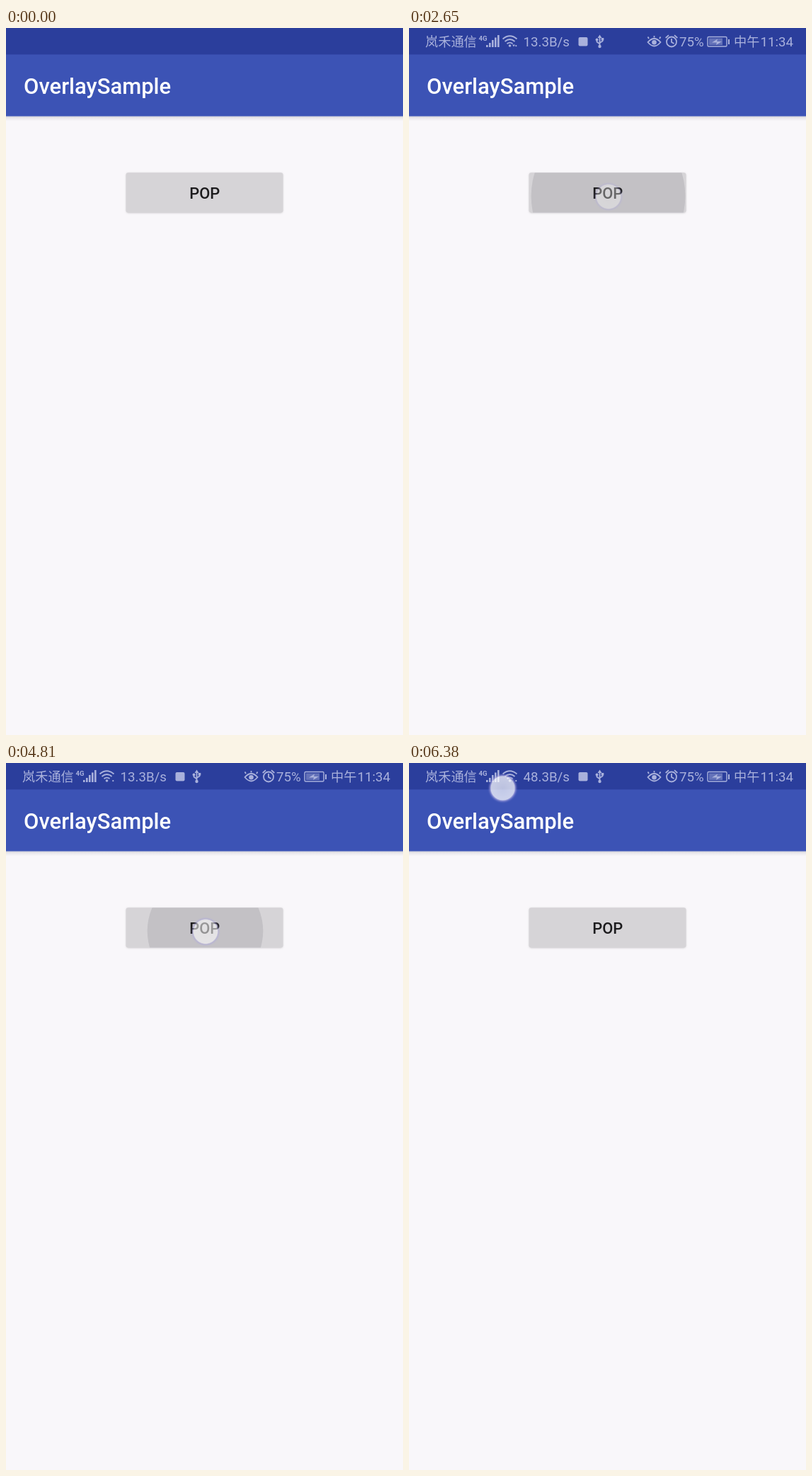
Recreate the animation shown at these times as an HTML page. Size 561 by 998 pixels, loop 6.6 s.

```html
<!DOCTYPE html>
<html lang="zh-CN">
<head>
<meta charset="utf-8">
<title>Popup demo</title>
<style>
html, body { margin: 0; width: 100%; height: 100%; overflow: hidden; background: #f9f7fa; }
svg { display: block; }
text { font-family: Roboto, "Noto Sans CJK SC", "Noto Sans CJK", sans-serif; }
.status { font-size: 18.7px; fill: #a9b1dc; }
.status .han { font-size: 18.2px; }
.status .network { font-size: 9.5px; font-weight: 700; }
.line { fill: none; stroke: #a9b1dc; stroke-width: 1.8; }
.menu { font-size: 21.6px; font-weight: 300; fill: #69686c; text-anchor: middle; }
</style>
</head>
<body>
<svg width="561" height="998" viewBox="0 0 561 998">
  <defs>
    <linearGradient id="barShadow" x2="0" y2="1">
      <stop stop-color="#888794" stop-opacity=".34"/>
      <stop offset=".4" stop-color="#888794" stop-opacity=".12"/>
      <stop offset="1" stop-color="#888794" stop-opacity="0"/>
    </linearGradient>
    <radialGradient id="touch">
      <stop stop-color="#fff" stop-opacity=".68"/>
      <stop offset=".77" stop-color="#fff" stop-opacity=".74"/>
      <stop offset=".84" stop-color="#a9a4e0" stop-opacity=".62"/>
      <stop offset=".92" stop-color="#a9a4e0" stop-opacity=".15"/>
      <stop offset="1" stop-color="#a9a4e0" stop-opacity="0"/>
    </radialGradient>
    <filter id="blur" x="-10%" y="-20%" width="120%" height="150%"><feGaussianBlur stdDeviation="1.4"/></filter>
    <clipPath id="buttonClip"><rect x="169.5" y="204.3" width="222" height="56.1" rx="3"/></clipPath>
  </defs>

  <rect width="561" height="998" fill="#f9f7fa"/>
  <rect y="124.6" width="561" height="7" fill="url(#barShadow)"/>
  <rect y="37" width="561" height="87.6" fill="#3c53b5"/>
  <rect width="561" height="37.4" fill="#2b3e9c"/>
  <text x="25" y="93" font-size="31" font-weight="500" fill="#fff">OverlaySample</text>

  <g id="status" class="status">
    <text class="han" x="23" y="26">岚禾通信</text>
    <text class="network" x="98.5" y="17.5">4G</text>
    <g id="bars"></g>
    <path class="line" d="M132.5 15.5Q142.5 7 152.5 15.5M135.500 19Q142.500 13 149.500 19M138.500 22.300Q142.500 19 146.500 22.300"/>
    <circle cx="142.5" cy="25" r="1.8"/>
    <path id="activity" d="M146 23.5h4l-2 3z"/>
    <circle cx="151.3" cy="25.2" r="1.1"/>
    <text id="speed" x="161.5" y="26"></text>
    <rect x="239.5" y="13" width="13" height="12.5" rx="2"/>
    <path class="line" d="M269.5 13V26M265.5 16.5V19.5L269.5 22.5M273.5 15.5V18.5L269.5 21"/>
    <path d="M266.5 14L269.5 9.5L272.5 14zM271.7 14h3.6v3.6h-3.6z"/>
    <circle cx="265.5" cy="16.5" r="1.9"/><circle cx="269.5" cy="26" r="2.2"/>
    <path class="line" d="M337.5 20Q346.5 10 355.5 20Q346.5 31 337.5 20zM339 15l-1.5-2.5M346.5 13.5V11M354 15l1.5-2.5"/>
    <circle cx="346.5" cy="20.3" r="3.3"/>
    <path class="line" d="M364 19.5a7 7 0 1 0 14 0a7 7 0 1 0-14 0M371 15v5l3.5 2M362.7 14l4.3-3.8M379.3 14l-4.3-3.8"/>
    <text x="382" y="26">75%</text>
    <rect class="line" style="stroke-width:1.4" x="422" y="12.5" width="27" height="13.5" rx="1.5"/>
    <rect x="424" y="14.5" width="19" height="9.5" opacity=".45"/>
    <path d="M428 20.5l8-5-1 3.5h7l-8 5 1-3.5z"/>
    <rect x="451" y="16" width="2" height="7"/>
    <text x="459" y="26"><tspan class="han">中午</tspan><tspan x="496.5">11:34</tspan></text>
  </g>

  <rect x="170" y="205" width="221" height="56" rx="3" fill="#777" opacity=".38" filter="url(#blur)"/>
  <rect x="169.5" y="204.3" width="222" height="56.1" rx="3" fill="#d6d4d7"/>
  <circle id="ripple" cx="281.5" cy="237" fill="#2a2838" clip-path="url(#buttonClip)"/>
  <text x="280.7" y="240.7" font-size="21.8" font-weight="500" fill="#1c1b1d" text-anchor="middle">POP</text>

  <g id="menu" class="menu">
    <text x="280.5" y="852">好</text>
    <text x="280.5" y="914.5">一般</text>
    <text x="280.5" y="977">差</text>
    <path d="M163.5 874H397.5M163.5 936.5H397.5" stroke="#9b9a9d" stroke-width="1.5"/>
  </g>
  <circle id="pointer" r="21.5" fill="url(#touch)"/>
</svg>
<script>
const LOOP = 6600;
const el = id => document.getElementById(id);
const ramp = (t, from, to) => Math.min(1, Math.max(0, (t - from) / (to - from)));
const set = (id, attrs) => {
  for (const name in attrs) el(id).setAttribute(name, attrs[name]);
};

const opens = [2490, 4700];
const closes = [3730, 5510];
const taps = [
  { at: 2490, x: 282, y: 238 },
  { at: 3730, x: 300, y: 560 },
  { at: 4700, x: 282, y: 238 },
  { at: 5510, x: 95, y: 398 },
  { at: 6380, x: 132.5, y: 35.5, held: true }
];

el('bars').innerHTML = [3, 6, 10, 13.5, 17].map((h, i) =>
  `<rect x="${109 + i * 4}" y="${27 - h}" width="2.6" height="${h}"/>`).join('');

function draw(t) {
  set('status', { opacity: t < 50 ? 0 : 0.25 + 0.75 * ramp(t, 50, 220) });
  el('speed').textContent = t < 1950 ? '46.7B/s' : t < 5000 ? '13.3B/s' : '48.3B/s';
  set('activity', { opacity: t < 3900 ? 1 : 0 });

  const tap = taps.filter(p => p.at <= t).pop();
  const age = tap ? t - tap.at : 0;
  set('pointer', {
    cx: tap ? tap.x : 0,
    cy: tap ? tap.y : 0,
    opacity: !tap ? 0 : tap.held ? 1 : 1 - ramp(age, 70, 240)
  });

  // The ripple spreads fast, then slows and fades
  const pressed = tap && opens.includes(tap.at);
  const grow = Math.max(0, age - 72) / 268;
  set('ripple', {
    r: pressed ? 116 * (1 - 400 ** (-1.4 * grow)) : 0,
    opacity: 0.11 * (1 - ramp(age, 200, 450))
  });

  const shown = opens.reduce((sum, at, i) =>
    sum + ramp(t, at + 230, at + 330) - ramp(t, closes[i] + 70, closes[i] + 190), 0);
  set('menu', { opacity: shown });
}

function tick() {
  draw(performance.now() % LOOP);
  requestAnimationFrame(tick);
}
tick();
</script>
</body>
</html>
```
